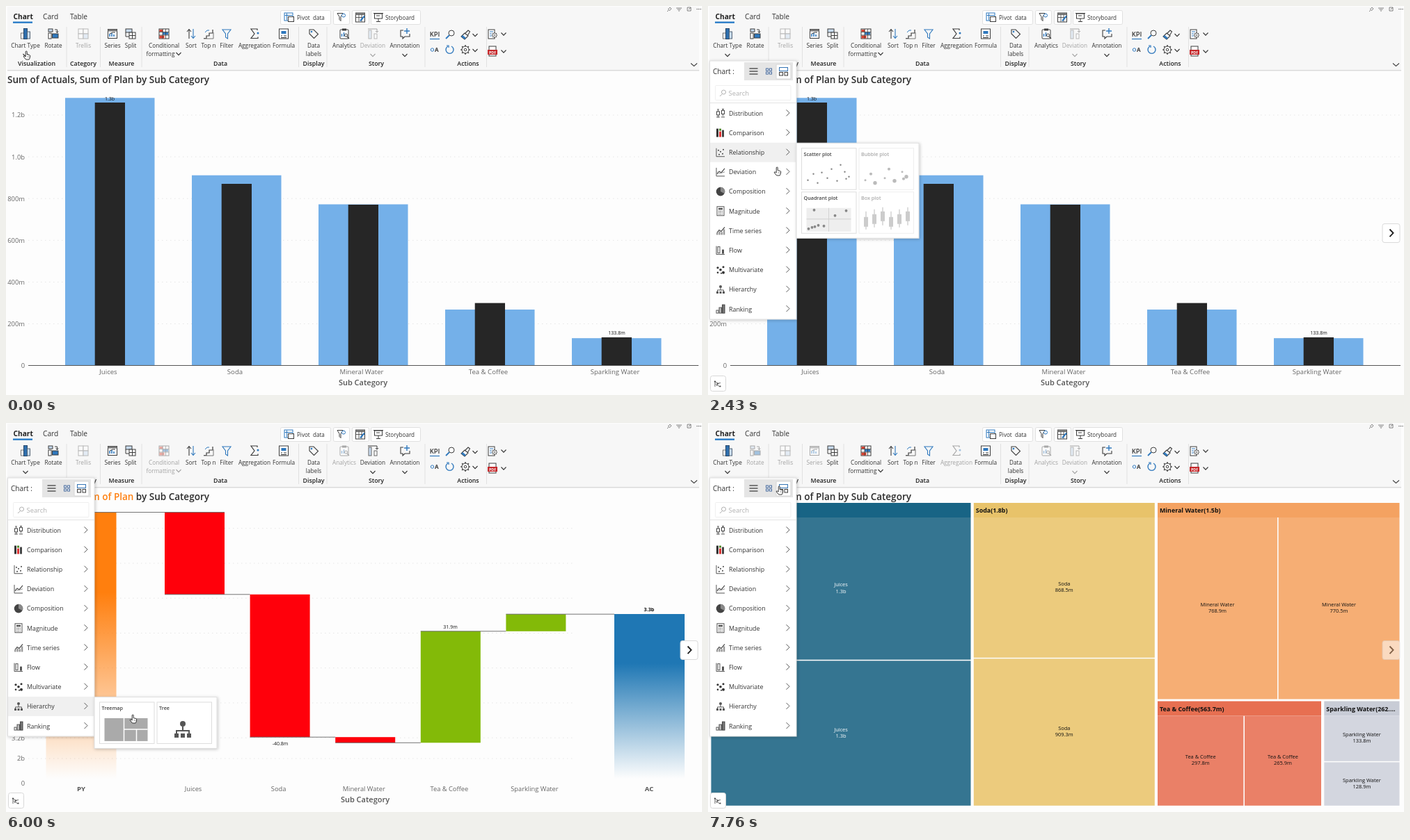
These frames come from a looping animation (1000 px wide and 560 px high, 8000 ms). An HTML page:

```html
<!DOCTYPE html>
<html lang="en">
<head>
<meta charset="utf-8">
<title>Chart types</title>
<style>
html, body { margin: 0; width: 100%; height: 100%; overflow: hidden; background: #fdfdfd; }
svg { display: block; width: 100vw; height: 100vh; }
text { font-family: "Open Sans", "Noto Sans", sans-serif; white-space: pre; }
</style>
</head>
<body>
<svg id="stage" viewBox="0 0 1000 560"></svg>
<script>
const INK = '#3c3c3c', BLUE = '#2f78bd', PALE = '#c9dcf0';

// Drawing helpers
const text = (x, y, s, size, o = {}) =>
  `<text x="${x}" y="${y}" font-size="${size}" fill="${o.fill || '#333'}" font-weight="${o.w || 400}" text-anchor="${o.a || 'start'}">${s.replace(/&/g, '&amp;')}</text>`;
const mid = (x, y, s, size, o = {}) => text(x, y, s, size, { ...o, a: 'middle' });
const line = (d, c = INK, w = 1, extra = '') => `<path d="${d}" fill="none" stroke="${c}" stroke-width="${w}" ${extra}/>`;
const area = (d, c = INK) => `<path d="${d}" fill="${c}"/>`;
const rect = (x, y, w, h, fill = 'none', stroke = 'none', r = 0) =>
  `<rect x="${x}" y="${y}" width="${w}" height="${h}" fill="${fill}" stroke="${stroke}" rx="${r}"/>`;
const dot = (x, y, r, fill = INK, stroke = 'none') => `<circle cx="${x}" cy="${y}" r="${r}" fill="${fill}" stroke="${stroke}"/>`;
const dots = (pts, r, c) => pts.map(p => dot(p[0], p[1], p[2] || r, c)).join('');
const at = (x, y, s) => `<g transform="translate(${x} ${y})">${s}</g>`;
const group = (id, s) => `<g id="${id}">${s}</g>`;
const down = (x, y) => line(`M${x - 3.5} ${y - 2}l3.5 3.6 3.5-3.6`, '#333', 1.1);
const columns = (hs, w, gap, base, c) => hs.map((h, i) => rect(-6 + i * (w + gap), base - h, w, h, Array.isArray(c) ? c[i] : c)).join('');

// Ribbon icons, centred on 0,0
const tiles = c => [0, 1, 2, 3].map(i => rect(-7 + (i % 2) * 7, -7 + (i >> 1) * 7, 7, 7, i === c ? PALE : '#fff', '#666')).join('');
const sheet = rect(-6.5, -6.5, 13, 13, '#fff', INK) + rect(-6.5, -6.5, 13, 3, '#777');
const clip = rect(-6, -6, 12, 13, '#fff', INK, 1) + rect(-3, -7.5, 6, 3, INK) + line('M-3.5 4V0M-.5 4V-2', BLUE, 1.4) + dot(2.5, 2, 2, 'none', INK) + line('M4 4l3 3', INK, 1.2);
const gear = dot(0, 0, 5, '#fff', INK) + dot(0, 0, 1.8, '#fff', INK) + line('M0-5v-1.7M0 5v1.7M-5 0h-1.7M5 0h1.7M3.5-3.5l1.3-1.3M-3.5-3.5l-1.3-1.3M3.5 3.5l1.3 1.3M-3.5 3.5l-1.3 1.3', INK, 1.7);
const funnel = line('M-6-6h12l-4.5 6v7l-3-2v-5z', BLUE, 1.1);

const tools = [
  ['Chart Type', 28, rect(-6.5, -1, 4, 8, '#fff', '#777') + rect(-2.5, -7.5, 5, 15, '#2f6fad', '#29496b') + rect(2.5, -3, 4, 10, PALE, '#567')],
  ['Rotate', 68, rect(-7, -7, 6, 4, PALE, INK) + rect(-7, -1, 4, 8, '#fff', INK) + rect(-1.5, 0, 8.5, 6, BLUE, INK) + line('M2-6h3.5v4M3.5-3.5l2 2 2-2', INK)],
  ['Trellis', 111, tiles(3)],
  ['Series', 153, sheet + line('M-4 4V0M-1 4V-1M2 4V1', BLUE, 1.6) + line('M-4 0l4-2 4 0', INK)],
  ['Split', 179, rect(-7, -7, 9, 5, PALE, INK) + rect(-2, -2, 9, 9, '#fff', INK) + line('M-7-2v6h5M2.5-2v9M-2 2.5h9', INK)],
  ['Conditional|formatting', 227, rect(-7, -7, 14, 14, '#fff', INK) + rect(-6.5, -6, 5, 3, '#d8402f') + rect(-2, -2, 8, 3.5, BLUE) + rect(-6.5, 2.5, 7, 4, '#d8402f') + line('M-7-2.5H7M-7 2H7M-2-7V7M2.5-7V7', INK, .8)],
  ['Sort', 266, line('M-3 7V-6M-6-3l3-3.5 3 3.5', INK, 1.1) + line('M3-7V6M0 3l3 3.5 3-3.5', BLUE, 1.1)],
  ['Top n', 291, line('M-7 6.5h4V3h4v-4h5v-5', INK, 1.2) + line('M-7 7H7V-2', '#777') + line('M-5-2l3-3h3', BLUE)],
  ['Filter', 317, funnel],
  ['Aggregation', 357, line('M4-5v-2h-9l5 7-5 6.5h10v-2', INK, 1.2) + dot(5, -1, 1.5, BLUE)],
  ['Formula', 399, rect(-6.5, -7, 13, 14, '#fff', INK) + rect(-3.5, -4, 7, 4, BLUE) + line('M-4 3h2m2 0h4M-4 5.5h8', INK)],
  ['Data|labels', 442, line('M-6-6h6l6.5 6.5-6 6L-6 0z', INK, 1.1) + dot(-3, -3, 1.3, BLUE)],
  ['Analytics', 486, clip],
  ['Deviation', 527, rect(-6, -5, 4, 12, PALE, '#666') + rect(2, 0, 4, 7, '#fff', '#666') + line('M-7-7H6v5M4-4l2 2 2-2', INK)],
  ['Annotation', 573, line('M-2-5h-4V4h3v3l3-3h7V0', INK, 1.1) + line('M3-8v8M-1-4h8', BLUE, 1.4)]
];
const off = { bar: [2, 13], fall: [2, 5, 12], tree: [1, 2, 3, 9, 12, 13] };

function ribbon() {
  let s = rect(2, 1, 994, 91.5, '#f7f7f7') + line('M2 92.5H996', '#d9d9d9') + line('M2 93.5H996', '#eeeeee');
  s += text(10.5, 18.5, 'Chart', 10.2, { w: 700, fill: '#222' }) + text(53, 18.5, 'Card', 10.2) + text(92, 18.5, 'Table', 10.2) + rect(10, 22.5, 28, 2.2, '#1b74c5');
  s += [[394, 72], [470, 23], [497, 24], [524, 71]].map(b => rect(b[0] + .5, 6.5, b[1], 20, '#fff', '#e0e0e0', 2)).join('');
  s += at(406.5, 16.5, rect(-6.5, -6.5, 12, 11, '#fff', BLUE) + line('M-6-3h11M-3-6V4', BLUE) + rect(-1, -1, 8, 7, '#fff', INK));
  s += text(418, 19.5, 'Pivot  data', 8.1) + text(545, 19.5, 'Storyboard', 8.1);
  s += at(482, 16.5, line('M-6-6h8l-3 5v6l-2-2v-4z', INK) + dot(3, -3, 2.5, '#fff', BLUE));
  s += at(509, 16.5, sheet + line('M-6 0H6M-2-4V6M2-4V6', INK, .8) + line('M0 5l6-7', BLUE, 2));
  s += at(535, 16, rect(-5.5, -5, 11, 7, '#fff', INK) + line('M-7-5.5H7M0 2v5M-3 6.5h6M-3-2h5', INK));
  s += [87, 135.5, 195, 420.5, 461, 602, 690.5].map(x => line(`M${x} 30V88`, '#e1e1e1')).join('');
  s += '<rect id="hot" x="6" y="30" width="45" height="47" fill="#d2d2d2"/>';
  tools.forEach(([name, x, icon], i) => {
    const extra = i === 5 ? down(248, 69) : [0, 13, 14].includes(i) ? down(x, 71) : '';
    const label = name.split('|').map((n, k) => mid(i === 5 && k ? 222 : x, 60 + k * 11.7, n, 8.25)).join('');
    s += group('tool' + i, at(x, 40, icon) + label + extra);
  });
  [['Visualization', 44], ['Category', 111], ['Measure', 166], ['Data', 308], ['Display', 442], ['Story', 532], ['Actions', 664]]
    .forEach(g => s += mid(g[1], 85.5, g[0], 8.8, { w: 600, fill: '#222' }));
  s += mid(616, 44, 'KPI', 9.3, { w: 600 }) + line('M609 47.5h14', BLUE, 1.2);
  s += at(638, 41, dot(2, -2, 4, '#fff', INK) + line('M-1 1l-5 5', BLUE, 1.8));
  s += at(660, 42, line('M-6 2l5-5 5 4-5 5zM0-3l4-4 2.5 2-3 5', INK, 1.1) + area('M-6 2l2-2 5 4-2 2z', BLUE));
  s += dot(612.5, 63, 2.2, '#fff', BLUE) + text(616, 66, 'A', 8, { w: 700 });
  s += at(638, 63, line('M-3-5A5.5 5.5 0 1 0 2-5', BLUE, 1.4) + line('M-5-6h3v3', BLUE, 1.2)) + at(660, 63, gear);
  s += at(699, 41, rect(-6, -7, 9, 13, '#fff', INK) + line('M-4-4h5M-4-1h3M-4 2h3', BLUE) + `<g transform="translate(3 1) scale(.6)">${gear}</g>`);
  s += at(699, 65, rect(-5, -7, 10, 14, '#fff', INK) + rect(-7, -2, 14, 7, '#c5282b') + mid(0, 3.6, 'PDF', 5.2, { w: 700, fill: '#fff' }));
  s += down(674, 42) + down(674, 64) + down(715, 40.5) + down(715, 65.5) + line('M984 82.5l4.5 4 4.5-4', '#444', 1.1);
  s += at(953, 5, line('M-3 3l2-2M-2-1l3 3M-1-1l2-2 2 2-2 2', '#666', .8)) + line('M963 3h8M964.5 5h5M966 7h2', '#666', .8)
    + line('M979 2h5v5h-5zM981 5l3-3', '#666', .8) + dots([[993, 4.5], [995.5, 4.5], [998, 4.5]], .7, '#555');
  return s;
}

// Charts
const names = ['Juices', 'Soda', 'Mineral Water', 'Tea & Coffee', 'Sparkling Water'];
const AX = { fill: '#666' }, DARK = { fill: '#111' };
const title = s => `<text x="2" y="110.5" font-size="13.5" font-weight="600" fill="#2b2b2b">${s}</text>`;
const plain = title('Sum of Actuals, Sum of Plan by Sub Category');
const grid = (rows, x2) => rows.map(([s, y]) =>
  line(`M32 ${y}H${x2}`, '#e6e6e6', 1, 'stroke-dasharray="1.5 4.5"') + text(27, y + 3.4, s, 9.4, { ...AX, a: 'end' })).join('');

function barChart() {
  const steps = ['200m', '400m', '600m', '800m', '1.0b', '1.2b'];
  let s = plain + grid(steps.map((v, i) => [v, 457.5 - i * 60.1]), 995) + text(27, 521, '0', 9.4, { ...AX, a: 'end' });
  const plan = [132.3, 243.7, 285.5, 437, 478.2], act = [139, 256, 286, 427.6, 477];
  names.forEach((n, i) => {
    const x = 85 + i * 182;
    s += rect(x, plan[i], 128.5, 517.5 - plan[i], '#74b0e9') + rect(x + 42.7, act[i], 43.3, 517.5 - act[i], '#262626');
    s += mid(x + 62, 530, n, 9.6, AX);
  });
  return s + line('M32 517.5H995', '#555', 1.2) + mid(149, 135.6, '1.3b', 7, DARK) + mid(877.5, 473.3, '133.8m', 7, DARK)
    + mid(513, 546.3, 'Sub Category', 11, { w: 600, fill: '#555' });
}

function waterfall() {
  let s = title('<tspan fill="#1f77b4">Sum of Actuals, </tspan><tspan fill="#ff7f0e">Sum of Plan</tspan> by Sub Category');
  const steps = ['3.35b', '3.34b', '3.33b', '3.32b', '3.31b', '3.30b', '3.2b'].map((v, i) => [v, 151.7 + i * 50.25]);
  s += grid([...steps, ['2b', 483]], 817) + text(27, 521.5, '0', 9.4, { ...AX, a: 'end' });
  s += rect(57.5, 128.5, 101, 384, 'url(#orange)') + rect(874, 275, 101, 237, 'url(#blue)');
  const level = [128.5, 246.8, 452.2, 460.3, 299.8, 275.2];
  names.forEach((n, i) => {
    const x = 228 + i * 122.6, a = level[i], b = level[i + 1];
    s += rect(x, Math.min(a, b), 86, Math.abs(b - a), i < 3 ? '#ff000b' : '#83ba08') + mid(x + 41, 530, n, 9.3, AX);
    s += line(`M${x} ${b}H${i < 4 ? x + 122.6 : 874}`, '#666', .9);
  });
  s += line('M57.5 128.5H314', '#666', .9);
  const bold = { w: 700, fill: '#111' }, end = { w: 700, fill: '#555' };
  s += mid(108, 124.2, '3.4b', 7.2, bold) + mid(924, 270.6, '3.3b', 7.2, bold) + mid(394, 463.6, '-40.8m', 7, DARK) + mid(638.5, 295.6, '31.9m', 7, DARK);
  return s + mid(108, 530, 'PY', 9.6, end) + mid(924, 530, 'AC', 9.6, end) + mid(516, 546.3, 'Sub Category', 11, { w: 600, fill: '#555' });
}

function treemap() {
  const head = (x, y, w, s, c, fill = '#111') => rect(x, y, w, 21, c) + text(x + 3, y + 14, s, 8.9, { w: 700, fill });
  const cell = (x, y, w, h, n, v, c, fill = '#111') =>
    rect(x, y, w, h, c) + mid(x + w / 2, y + h / 2 - 3, n, 7.45, { fill }) + mid(x + w / 2, y + h / 2 + 6.3, v, 7.45, { fill });
  const W = '#fff';
  return plain
    + head(4.5, 115, 373, 'Juices(2.5b)', '#186485', W) + cell(4.5, 136, 373, 204.7, names[0], '1.3b', '#357591', W) + cell(4.5, 342.3, 373, 208.5, names[0], '1.3b', '#357591', W)
    + head(381.8, 115, 260, 'Soda(1.8b)', '#e8c36a') + cell(381.8, 136, 260, 201.8, names[1], '868.5m', '#eccb7d') + cell(381.8, 339.3, 260, 211.5, names[1], '909.3m', '#eccb7d')
    + head(646, 115, 347.5, 'Mineral Water(1.5b)', '#f4a261') + cell(646, 136, 172, 261.5, names[2], '768.9m', '#f6ae74') + cell(819.6, 136, 173.9, 261.5, names[2], '770.5m', '#f6ae74')
    + head(646, 400.5, 235, 'Tea & Coffee(563.7m)', '#e76f51') + cell(646, 421.5, 123.4, 129.3, names[3], '297.8m', '#ea8067') + cell(771, 421.5, 110, 129.3, names[3], '265.9m', '#ea8067')
    + head(885.3, 400.5, 108.2, 'Sparkling Water(262....', '#c8ccd6') + cell(885.3, 421.5, 108.2, 65.3, names[4], '133.8m', '#d3d6df') + cell(885.3, 488.4, 108.2, 62.4, names[4], '128.9m', '#d3d6df');
}

// Menus; icons fit a 13 px box
const axes = line('M-6-6V6H6', '#555');
const org = dot(0, -4, 2, '#555') + line('M0-2v3M-4.5 3V1h9v2', '#555') + [-6, -1.5, 3].map(x => rect(x, 3, 3, 3, '#555')).join('');
const pie = dot(0, 0, 6.3, '#444') + area('M0 0V-6.3A6.3 6.3 0 0 1 5.5 3z', '#8a8a8a');
const bubbles = dots([[-4, -3, 1.6], [0, 0, 1.8], [4, -4, 1.5], [4, 4, 2], [-4, 4, 1.3], [1, 5, 1]], 1, '#333');
const boxes = line('M-4-6V6M0-5V5M4-6V4', '#444', .9) + rect(-5.5, -3, 3, 5, '#444') + rect(-1.5, -1, 3, 4, '#fff', '#444') + rect(2.5, -4, 3, 5, '#444');
const spans = line('M-3.5-5V6M3.5-6V4M-6 5.5h5M1 5.5h5M-5-5.5h3M2-6h3', '#444', .9) + rect(-5.5, -2.5, 4, 5, '#fff', '#444') + rect(1.5, -4, 4, 5, '#fff', '#444');
const rows = (k = 1) => [-4, 0, 4].map(y => line(`M-6 ${y}H6`, '#333', k)).join('');
const trend = line('M-5 3l3-4 3 2 5-6', '#444', 1.1);
const kinds = [
  ['Bar/Column', columns([6, 12, 8, 10], 2.6, .9, 6, '#333')],
  ['Line', axes + trend],
  ['Area', axes + area('M-5 6V-1l3-3 3 4 5-5V6z', '#555')],
  ['Waterfall', rect(-6, 0, 4, 6, '#fff', '#777') + rect(-2, -6, 4, 12, '#555') + rect(2, -3, 4, 9, '#fff', '#777')],
  ['Combo', columns([4, 6, 5, 9], 2.4, .9, 6, '#a6a6a6') + line('M-6 2l4-4 3 2 5-6', '#2c63c4', 1.2) + axes],
  ['Funnel', area('M-7-6H7V-3H-7zM-5.5-2h11L4 1h-8zM-3.5 2h7l-1 4h-5z', '#444')],
  ['Bubble/Scatter', axes + bubbles], ['Pie/Donut', pie],
  ['Hierarchy', rect(-7, -6, 14, 12, '#444') + line('M-1-6V6M-1 0H7M3 0v6M-7 2h6', '#fff', .8)],
  ['Gauge', line('M-6 4A6 6 0 0 1 3-3', '#444', 4) + line('M3-3A6 6 0 0 1 6 4', '#bbb', 4)],
  ['Radar/Polar', line('M0-7L7-2 4.5 6h-9L-7-2z', '#555') + line('M0-3L4-1 2 4-3 3-4-1z', '#555') + area('M0-3L3-1 1 3-2 2z', '#888')],
  ['Statistical', axes + boxes],
  ['Bullet', rect(-6, -6, 3.5, 12, '#d33') + rect(2, -4, 4, 10, '#6cae1c') + line('M-8-1h7M0-2h8', '#222', 1.4)],
  ['Marimekko', rect(-7, -6, 14, 13, '#333') + line('M-2-6V7M3-6V7', '#ddd', .9)],
  ['Special Charts', line('M-5-5V6M0-5V6M5-5V6', '#4a9e2f', 1.2) + dots([[-5, 5], [0, -4], [5, 5]], 1.7, '#d33') + dots([[-5, -5], [0, 5], [5, -5]], 1.7, '#333')]
];
const topics = [
  ['Distribution', spans], ['Comparison', columns([12, 8, 10], 3, 1, 6, ['#333', '#d33', '#444']) + rect(-2, -6, 3, 3, '#4f8a2b')],
  ['Relationship', axes + dots([[-2, 3], [0, -1], [3, 2], [4, -4], [-3, -3]], 1, '#444')], ['Deviation', axes + trend + line('M-5 0l4 2 7-2', '#999')],
  ['Composition', pie], ['Magnitude', rect(-5, -6.5, 10, 13, '#fff', '#555') + rect(-3, -4.5, 6, 2.5, '#555') + line('M-3 0h6M-3 2h6M-3 4.5h6', '#555', 1, 'stroke-dasharray="1.5 1"')],
  ['Time series', columns([3, 5, 4, 8], 2.4, .9, 6, '#999') + trend], ['Flow', axes + rect(-4, -5, 3, 9, '#fff', '#555') + rect(2, -1, 3, 6, '#555')],
  ['Multivariate', bubbles], ['Hierarchy', org], ['Ranking', rect(-6, 2, 3, 4, '#fff', '#555') + rect(-2, -2, 3.5, 8, '#bbb', '#555') + rect(2.5, -6, 3.5, 12, '#777', '#444')]
];

function toggle(on) {
  const x = [65, 87, 108][on];
  return rect(52, 81, 70, 26, '#e5e5e5') + rect(x - 10, 84, 21, 21, '#fff', '#d4d4d4', 1) + at(65.5, 94, rows(1.2))
    + at(87.5, 94, [0, 1, 2, 3].map(i => rect(-4 + (i % 2) * 5, -4 + (i >> 1) * 5, 3, 3, '#fff', '#44689b')).join(''))
    + at(108.5, 94, rect(-6, -5.5, 12, 5, '#fff', '#3474b4') + rect(-6, 1.5, 5, 4.5, '#fff', INK) + rect(1.5, 1.5, 4.5, 4.5, '#fff', INK));
}
function menu(list, y0, step, x, h, head, on, sy, hover = '') {
  const soft = on ? '#b0b0b0' : '#888';
  let s = `<rect x="2.5" y="79" width="124.5" height="${h}" fill="#fff" stroke="#dedede" filter="url(#shade)"/>` + head + toggle(on);
  s += rect(10.5, sy, 108.5, 21, '#fff', on ? '#efefef' : '#e2e2e2', 1) + dot(22.5, sy + 9.5, 3, 'none', soft) + line(`M20.5 ${sy + 12}l-3.5 3.5`, soft) + text(29.5, sy + 14.3, 'Search', 9.4, { fill: soft });
  s += line(`M3 ${sy + 25}H127`, '#e4e4e4') + hover;
  list.forEach(([n, icon], i) => {
    const y = y0 + i * step;
    s += at(18, y, icon) + text(x, y + 3.4, n, 8.9) + line(`M112.5 ${y - 5}l4.5 4.5-4.5 4.5`, '#444', .9);
  });
  return s;
}

// Flyouts: [label, dimmed, drawing in a 70 x 34 box]
const spread = [[8, 27], [16, 18], [22, 31], [28, 16], [36, 24], [42, 11], [50, 28], [55, 5], [61, 15], [63, 25], [67, 22]];
const quad = rect(6, 4, 64, 34, '#eeeeee') + line('M6 20h64M38 4v34', '#d2d2d2') + dots([[17, 7], [47, 15], [63, 8], [9, 34], [14, 32], [18, 31], [23, 29], [31, 30]], 1.9, '#888');
const plots = [0, 1, 2, 3, 4, 5].map(i => line(`M${9 + i * 12} ${9 - i % 3 * 3}v26`, '#bbb') + rect(6 + i * 12, 17 - i % 3 * 4, 6, 14, '#ccc')).join('');
const bars = (hs, base) => hs.map((h, i) => rect(8 + i * 10, h > 0 ? base - h : base, 7, Math.abs(h), h > 0 ? '#999' : '#c8c8c8')).join('');
const drop = [0, 1, 2, 3, 4].map(i => rect(6 + i * 12, 4 + i * 5, 9, i % 4 ? 10 : 34 - i * 5, '#999')).join('');
const flyouts = {
  2: [['Scatter plot', 0, dots(spread, 1.2, '#888')], ['Bubble plot', 1, dots(spread.filter((p, i) => i % 4 < 3).map((p, i) => [p[0], p[1], 1.5 + i % 3 * .6]), 2, '#bbb')], ['Quadrant plot', 0, quad], ['Box plot', 1, plots]],
  3: [['Line', 0, line('M6 28l12-10 12 5 14-15 12 8 12-8', '#888')], ['Bar', 0, bars([18, -8, 12, -12, 8, -6], 22)], ['Area', 0, area('M6 36V26l16-10 14 6 16-14 16 6v22z', '#bbb')], ['Waterfall', 0, drop]],
  9: [['Treemap', 0, rect(6, 4, 62, 33, '#aaa') + line('M34 4v33M34 20h34M52 20v17', '#fff', 1.5)], ['Tree', 0, `<g transform="translate(36 20) scale(2)">${org}</g>`]]
};
const rowY = i => 154.4 + i * 28.17;
function flyout(i) {
  const y = rowY(i) - 13.5, cards = flyouts[i];
  return group('fly' + i, `<rect x="127" y="${y}" width="176" height="${cards.length > 2 ? 137 : 74}" fill="#fff" stroke="#ddd" filter="url(#shade)"/>`
    + cards.map(([n, dim, art], k) => at(134.5 + k % 2 * 82.5, y + 7.5 + (k >> 1) * 63, rect(0, 0, 78.5, 59.5, '#fff', dim ? '#eee' : '#ddd')
      + text(3, 11.2, n, 7.2, { fill: dim ? '#aaa' : '#444', w: 600 }) + at(1, 19, art))).join(''));
}

const nav = (x, d) => rect(x, 313.5, 25, 27, '#fff', '#dadada', 3) + line(d, '#222', 1.9);
const fade = (id, c) => `<linearGradient id="${id}" x1="0" y1="0" x2="0" y2="1"><stop offset=".3" stop-color="${c}"/><stop offset="1" stop-color="${c}" stop-opacity="0"/></linearGradient>`;
const tune = line('M-4-4v8M-4-3.5l4 3 4-1M-3 0l6 4M1-1l-3 4', '#555', .9) + dots([[-4, -3.5], [0, -.5], [3.5, 3.5]], 1.1, '#444');

document.getElementById('stage').innerHTML =
  `<defs>${fade('orange', '#ff7f0e')}${fade('blue', '#1f77b4')}<filter id="shade" x="-10%" y="-10%" width="125%" height="125%"><feDropShadow dx="1" dy="1" stdDeviation="2" flood-opacity=".22"/></filter></defs>`
  + rect(0, 0, 1000, 560, '#fdfdfd') + ribbon()
  + group('bar', barChart()) + group('fall', waterfall()) + group('tree', treemap())
  + group('nav', group('arrows', group('prev', nav(6, 'M20.5 321.5l-5 5.3 5 5.3')) + nav(969, 'M979.5 321.5l5 5.3-5 5.3'))
    + rect(3.5, 532.5, 22, 22, '#fff', '#d8d8d8', 3) + at(14, 544, tune))
  + group('kinds', menu(kinds, 153.2, 26.62, 33, 458, text(7, 91.5, 'All', 10) + text(7, 106.2, 'Charts', 10), 0, 116.5))
  + group('topics', menu(topics, rowY(0), 28.17, 30, 372, text(7, 97.5, 'Chart :', 10), 2, 114.5, '<rect id="row" x="3" width="124" height="28" fill="#f0f0f0"/>'))
  + Object.keys(flyouts).map(flyout).join('')
  + group('hand', `<path d="M-1.8-5.5q1.1-1 2 0V-1.3l3.6.8q1 .4.9 1.5l-.6 3.2-1 1.8h-4.5l-3.3-4q-.3-1.4 1-1.1l1.9 1z" fill="#fff" stroke="#222" stroke-width=".9" stroke-linejoin="round"/>` + line('M1.2 1v2M2.8 1.3v1.7', '#444', .5));

const $ = id => document.getElementById(id);
const show = (id, on) => $(id).setAttribute('display', on ? 'inline' : 'none');

// Pointer: [start, end, x, y, linear]
const moves = [[0, 0, 30, 71], [460, 500, 36, 90], [700, 700, 36, 60], [1260, 1600, 108, 95], [1800, 2100, 106, 162, 1], [2100, 2430, 100, 238, 1],
  [2430, 2560, 100, 246], [3360, 3360, 246, 324], [4130, 4760, 36, 60], [5330, 5660, 108, 95], [6000, 6000, 183, 426], [6760, 7430, 36, 60], [7760, 7760, 103, 97]];
function pointer(t) {
  let x = 0, y = 0;
  for (const [a, b, px, py, lin] of moves) {
    if (t < a) break;
    const k = b > a ? Math.min(1, (t - a) / (b - a)) : 1, e = lin ? k : k * k * (3 - 2 * k);
    x += (px - x) * e;
    y += (py - y) * e;
  }
  return [x, y];
}

// Value of the last step begun: [start, value]
const pick = (steps, t) => steps.reduce((v, s) => t >= s[0] ? s[1] : v, null);
const menus = [[760, 'kinds'], [1800, 'topics'], [3660, ''], [4900, 'kinds'], [5930, 'topics'], [6230, ''], [7700, 'kinds'], [7760, 'topics']];
const hovers = [[2040, 0], [2170, 1], [2290, 2], [2465, 3], [3660, -1], [6000, 9], [6230, -1]];
const charts = [[0, 'bar'], [3660, 'fall'], [6230, 'tree']];

function draw(t) {
  const chart = pick(charts, t), open = pick(menus, t), row = pick(hovers, t) ?? -1;
  const [x, y] = pointer(t);
  charts.forEach(c => show(c[1], c[1] === chart));
  tools.forEach((_, i) => $('tool' + i).setAttribute('opacity', off[chart].includes(i) ? .42 : 1));
  show('kinds', open === 'kinds');
  show('topics', open === 'topics');
  show('row', row >= 0);
  $('row').setAttribute('y', rowY(row) - 14);
  Object.keys(flyouts).forEach(i => show('fly' + i, +i === row));
  show('nav', t >= 700);
  $('arrows').setAttribute('opacity', chart === 'tree' ? .55 : 1);
  show('hot', t >= 700 && x > 6 && x < 51 && y > 30 && y < 77);
  $('hand').setAttribute('transform', `translate(${x} ${y})`);
}

const start = performance.now();
function tick() {
  draw((performance.now() - start) % 8000);
  requestAnimationFrame(tick);
}
tick();
</script>
</body>
</html>
```
